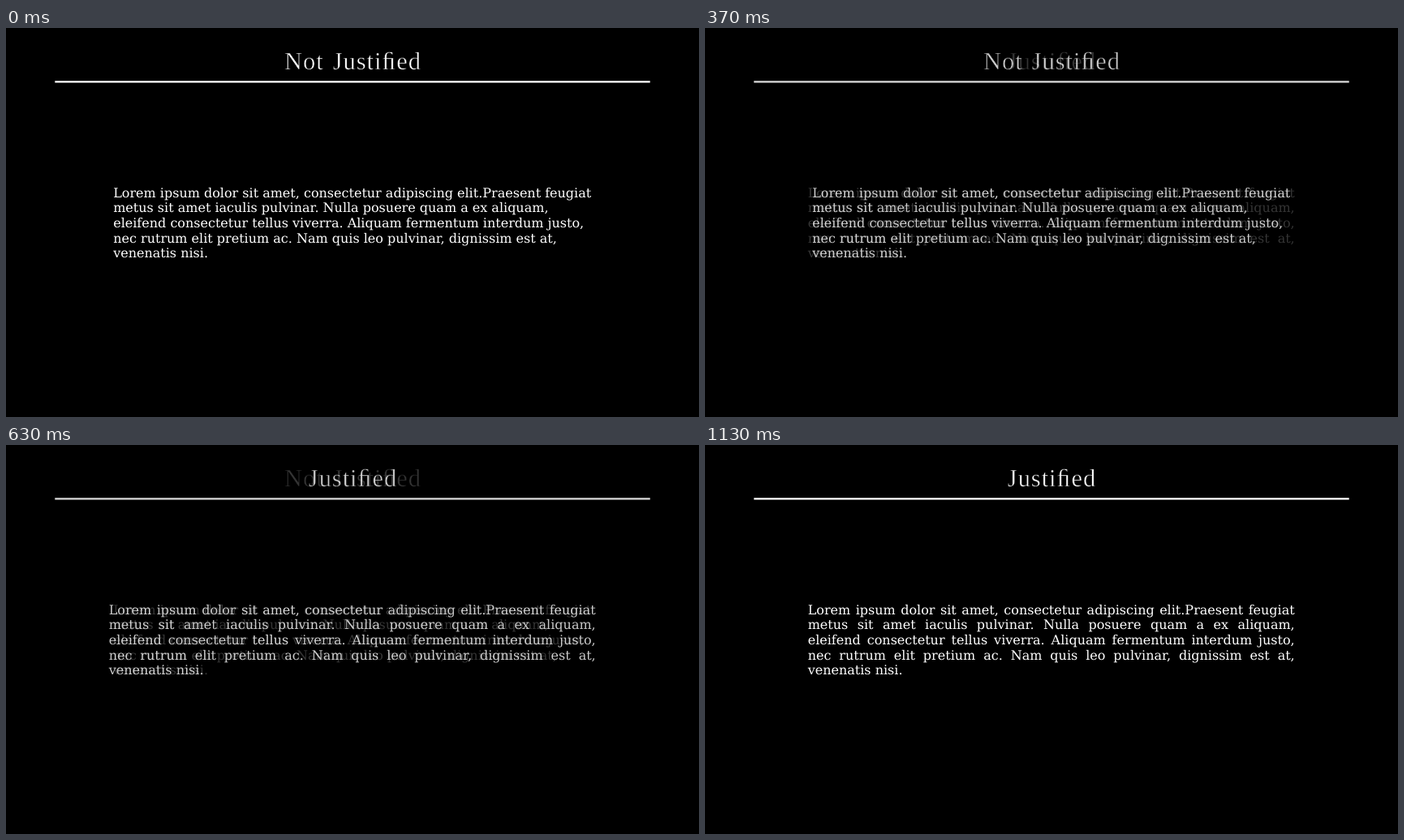
These frames come from a looping animation (854x480 px, 2010 ms). An HTML page:

```html
<!DOCTYPE html>
<html lang="en">
<head>
<meta charset="utf-8">
<title>Justified text</title>
<style>
  html, body { margin: 0; width: 100%; height: 100%; overflow: hidden; background: #000; }
  #stage { position: relative; width: 854px; height: 480px; overflow: hidden; background: #000; text-rendering: geometricPrecision; }
  .slide { position: absolute; inset: 0; color: #fff; }
  h1, p, svg { position: absolute; margin: 0; }
  /* The black outline thins the strokes of the heading. */
  h1 {
    top: 24px; left: 0.5px; width: 854px; text-align: center;
    font: 30.5px/34px "Liberation Serif", serif;
    letter-spacing: 0.95px; word-spacing: 2.4px;
    -webkit-text-stroke: 0.5px #000;
  }
  svg { left: 0; top: 0; }
  p { left: 132.2px; top: 194.65px; width: 600px; font: 16px/18.625px "DejaVu Serif", serif; }
  .justified p { left: 126.7px; text-align: justify; }
</style>
</head>
<body>
<div id="stage">
  <div class="slide"><h1>Not Justiﬁed</h1><p></p></div>
  <div class="slide justified"><h1>Justiﬁed</h1><p></p></div>
</div>
<script>
const LOOP = 2010, STEP = 100 / 3, FADE = 1000;
const [before, after] = document.querySelectorAll('.slide');
const rule = '<svg width="854" height="80"><path d="M60.3 66.4H793.7" stroke="#fff" stroke-width="2.4"/></svg>';

for (const slide of [before, after]) {
  slide.querySelector('p').textContent =
    'Lorem ipsum dolor sit amet, consectetur adipiscing elit.Praesent feugiat ' +
    'metus sit amet iaculis pulvinar. Nulla posuere quam a ex aliquam, ' +
    'eleifend consectetur tellus viverra. Aliquam fermentum interdum justo, ' +
    'nec rutrum elit pretium ac. Nam quis leo pulvinar, dignissim est at, ' +
    'venenatis nisi.';
  slide.insertAdjacentHTML('beforeend', rule);
}

// Sigmoid easing, rescaled to run exactly from 0 to 1.
const sigmoid = x => 1 / (1 + Math.exp(-x));
const edge = sigmoid(-5);
const smooth = x => (sigmoid(10 * x - 5) - edge) / (1 - 2 * edge);

function draw(now) {
  const time = Math.floor((now % LOOP + 4) / STEP) * STEP;
  const mix = smooth(Math.min(1, time / FADE));
  before.style.opacity = 1 - mix;
  after.style.opacity = mix;
}

const start = performance.now();
function tick() {
  draw(performance.now() - start);
  requestAnimationFrame(tick);
}
tick();
</script>
</body>
</html>
```
